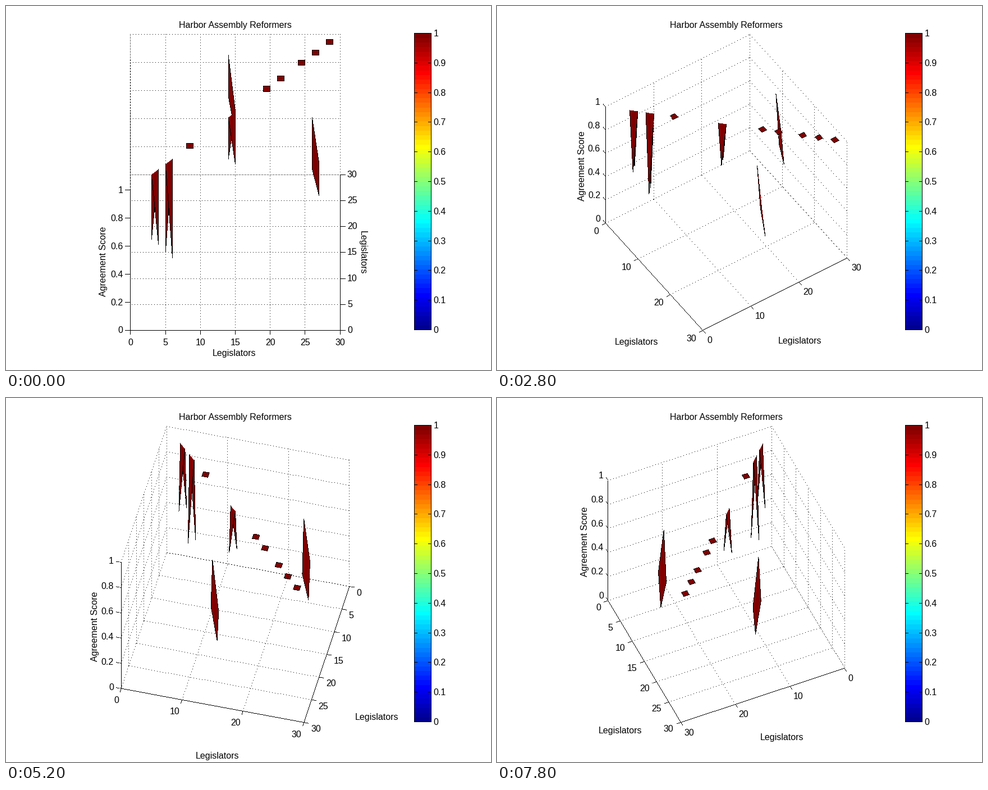
Recreate the animation shown at these times as a matplotlib script. Size 864x648 px, loop 8000 ms.

```python
import numpy as np
import matplotlib.pyplot as plt
from matplotlib.animation import FuncAnimation

W, H, DPI = 864, 648, 72
FRAMES, STEP_MS, AZ_STEP = 40, 200, 4
ELEV = np.radians(48)
SE, CE = np.sin(ELEV), np.cos(ELEV)
CX, CY, BOX_H = 408, 313.5, 527
N = 30
DARK_RED = (128, 0, 0)

plt.rcParams["font.family"] = "Liberation Sans"
fig = plt.figure(figsize=(W / DPI, H / DPI), dpi=DPI, facecolor="white")
ax = fig.add_axes([0, 0, 1, 1])
canvas = np.full((H, W, 3), 255, np.uint8)

# corner x, y and the heights at (0,0), (1,0), (1,1), (0,1)
CELLS = [(i, i, 1, 1, 1, 1) for i in (8, 19, 21, 24, 26, 28)]
CELLS += [(i, i, 1, h, 1, h) for i, h in ((3, 1 / 2), (5, 1 / 3), (14, 2 / 3))]
CELLS += [(26, 14, 1, 0.67, 0.406, 0.6), (14, 26, 1, 0.6, 0.406, 0.67)]

# axis label offsets from the middle of each axis, by angle
PHI = [2, 24, 42, 56, 66, 88]
LEFT_DX = [21, -1, -18, -31, -42.5, -71]
LEFT_DY = [86, 93, 108, 116, 123, 138]
RIGHT_DX = [104.5, 76.5, 57, 44.5, 34.5, 12]
RIGHT_DY = [120, 106, 94, 83.5, 75.5, 58]


class View:
    """Unit box seen from the side: p runs along the left axis, q along the right."""

    def __init__(self, az):
        self.turned = az >= 90
        self.deg = az % 90
        phi = np.radians(self.deg)
        self.c, self.s = np.cos(phi), np.sin(phi)
        self.scale = BOX_H / (SE * (self.c + self.s) + CE)

    def at(self, p, q, z):
        p, q, z = p - 0.5, q - 0.5, z - 0.5
        x = CX + self.scale * (p * self.c + q * self.s)
        up = SE * (q * self.c - p * self.s) + CE * z
        return x, CY - self.scale * up

    def depth(self, p, q, z):
        return CE * (p * self.s - q * self.c) + SE * z

    def box(self, x, y):
        return (y / N, 1 - x / N) if self.turned else (x / N, y / N)


def line(a, b, gap=1):
    """One pixel wide line; gap above 1 leaves single dots."""
    a, b = np.array(a), np.array(b)
    n = max(1, int(round(np.abs(b - a).max())))
    t = np.arange(0, n + 1, gap)[:, None] / n
    x, y = np.round(a + t * (b - a)).astype(int).T
    canvas[y, x] = 0


def fill(tri):
    """Paint the pixels whose centres lie in the triangle."""
    pts = np.array(tri)
    x0, y0 = np.floor(pts.min(axis=0)).astype(int)
    x1, y1 = np.ceil(pts.max(axis=0)).astype(int)
    y, x = np.mgrid[y0:y1 + 1, x0:x1 + 1]
    side = [(b[0] - a[0]) * (y - a[1]) - (b[1] - a[1]) * (x - a[0])
            for a, b in zip(pts, np.roll(pts, -1, axis=0))]
    inside = (np.min(side, axis=0) >= 0) | (np.max(side, axis=0) <= 0)
    canvas[y0:y1 + 1, x0:x1 + 1][inside] = DARK_RED


def text(x, y, s, ha="center", va="center", rot=0, z=50):
    return ax.text(x, y, s, ha=ha, va=va, rotation=rot, fontsize=16,
                   color="black", zorder=z)


def tick_step(deg, left):
    coarse = 10 < deg < 38 or (left and 50 < deg < 60)
    return 10 if coarse else 5


def draw_grid(v, ps, qs, zs):
    paths = [((p, 0, 0), (p, 1, 0), (p, 1, 1)) for p in ps]
    paths += [((1, q, 0), (0, q, 0), (0, q, 1)) for q in qs]
    paths += [((0, 0, z), (0, 1, z), (1, 1, z)) for z in zs]
    for a, b, c in paths:
        line(v.at(*a), v.at(*b), gap=5)
        line(v.at(*b), v.at(*c), gap=5)


def draw_axes(v, left, right, zs):
    """Axis lines, ticks and tick labels; left and right hold (place, value)."""
    out, d = [], 0.025
    flat = v.deg == 0
    corner, front = v.at(0, 0, 0), v.at(1, 0, 0)
    line(corner, v.at(0, 0, 1))
    line(corner, front)
    line(front, v.at(1, 1, 0))
    for z in zs:
        x, y = v.at(0, 0, z)
        line((x, y), v.at(-d, 0, z))
        out.append(text(x - 9.5 * v.c - 4, y - 9.7 * v.s + 0.5,
                        f"{z:g}", "right"))
    for p, val in left:
        x, y = v.at(p, 0, 0)
        line((x, y), v.at(p, -d, 0))
        dx = 0 if flat else -13 * v.s - 1
        out.append(text(x + dx, y + 5.8 + 16.3 * v.c, f"{val}",
                        "center" if flat else "right"))
    for q, val in right:
        x, y = v.at(1, q, 0)
        line((x, y), v.at(1 + d, q, 0))
        dy = 0 if flat else 9.5 + 10 * v.s
        out.append(text(x + 0.8 + 12 * v.c, y + dy, f"{val}", "left"))
    return out


def draw_labels(v):
    x, y = v.at(0, 0, 0.5)
    out = [text(x - 48.5 + 0.11 * v.deg, y + 2, "Agreement Score", rot=90)]
    if v.deg == 0:
        out.append(text(406, 623, "Legislators", va="baseline"))
        out.append(text(635, 438, "Legislators", rot=270))
        return out
    sides = (((0.5, 0, 0), LEFT_DX, LEFT_DY), ((1, 0.5, 0), RIGHT_DX, RIGHT_DY))
    for mid, dx, dy in sides:
        x, y = v.at(*mid)
        out.append(text(x + np.interp(v.deg, PHI, dx) - 0.5,
                        y + np.interp(v.deg, PHI, dy) + 4.5,
                        "Legislators", va="baseline"))
    return out


def draw_cells(v):
    tris = []
    for x, y, *hs in CELLS:
        spots = ((x, y), (x + 1, y), (x + 1, y + 1), (x, y + 1))
        quad = [(*v.box(*s), h) for s, h in zip(spots, hs)]
        tris += [(quad[0], quad[k], quad[2]) for k in (1, 3)]
    tris.sort(key=lambda t: sum(v.depth(*c) for c in t))
    for tri in tris:
        a, b, c = (v.at(*corner) for corner in tri)
        fill((a, b, c))
        line(a, b)
        line(b, c)


def draw_colorbar():
    x0, x1, y0, y1 = 727, 757, 48, 576
    k = np.arange(1, 65)
    jet = np.stack([np.clip(np.minimum(k - 8 - o, 56 + o - k) / 16, 0, 1)
                    for o in (16, 0, -16)], axis=1)
    level = np.linspace(1, 0, y1 - y0 + 1)
    bands = jet[np.minimum((level * 64).astype(int), 63)]
    strip = np.repeat(bands[:, None], x1 - x0 + 1, axis=1)
    strip[[0, -1]] = 0
    strip[:, [0, -1]] = 0
    for i in range(11):
        row = int(round((y1 - y0) * (1 - i / 10)))
        strip[row, :6] = strip[row, -6:] = 0
        text(761, y0 + row + 1, f"{i / 10:g}", "left", z=61)
    ax.imshow(strip, extent=(x0 - 0.5, x1 + 0.5, y1 + 0.5, y0 - 0.5),
              aspect="auto", interpolation="nearest", zorder=60)


draw_colorbar()
text(CX, 38.5, "Harbor Assembly Reformers", va="baseline")
picture = ax.imshow(canvas, extent=(-0.5, W - 0.5, H - 0.5, -0.5),
                    aspect="auto", interpolation="nearest", zorder=1)
ax.set_xlim(-0.5, W - 0.5)
ax.set_ylim(H - 0.5, -0.5)
ax.axis("off")
labels = []


def update(i):
    while labels:
        labels.pop().remove()
    canvas[:] = 255
    v = View(i * AZ_STEP)
    zs = np.arange(6) / 5
    left = [(t / N, t) for t in range(0, N + 1, tick_step(v.deg, True))]
    right = [(1 - t / N if v.turned else t / N, t)
             for t in range(0, N + 1, tick_step(90 - v.deg, False))]
    draw_grid(v, [p for p, _ in left], [q for q, _ in right], zs)
    labels.extend(draw_axes(v, left, right, zs))
    labels.extend(draw_labels(v))
    draw_cells(v)
    picture.set_data(canvas)
    return [picture, *labels]


anim = FuncAnimation(fig, update, frames=FRAMES, interval=STEP_MS,
                     init_func=lambda: update(0), repeat=True, repeat_delay=0)
plt.show()
```
